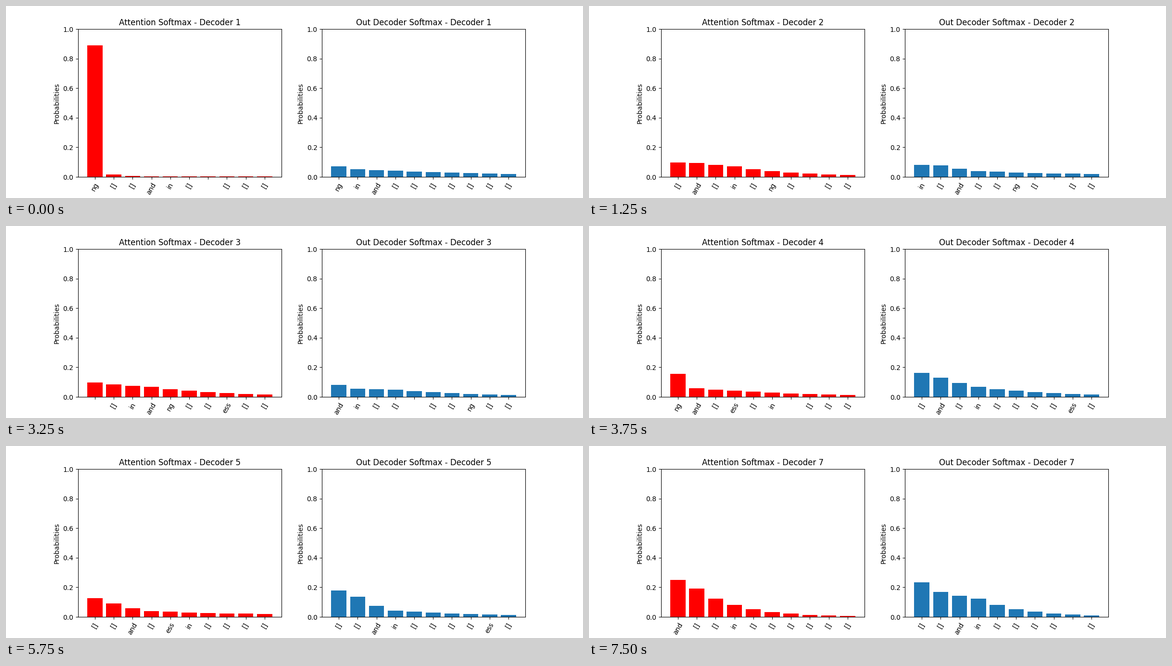
These frames come from a looping animation (1200x400 px, 8000 ms). A matplotlib script:

```python
import matplotlib.pyplot as plt
import numpy as np
from matplotlib.animation import FuncAnimation

plt.rcParams["font.family"] = "DejaVu Sans"

INTERVAL = 250        # ms per frame
FRAMES = 32
FRAMES_PER_STEP = 5   # each decoder stays for 1250 ms
RANKS = np.arange(10)
KEY_RANKS = (0, 1, 3, 9)

# Per decoder: the ranked tokens ("_" is blank) and the percentages at
# KEY_RANKS; the bars between them decay geometrically.
ATTENTION = [
    ("ng [] [] and in [] _ [] [] []", (89, 1.6, 0.3, 0.3)),
    ("[] and [] in [] ng [] _ [] []", (9.7, 9.4, 7.1, 1.3)),
    ("_ [] in and ng [] [] ess [] []", (9.7, 8.4, 6.8, 1.6)),
    ("ng and [] ess [] in _ [] [] []", (15.6, 5.8, 4.2, 1.3)),
    ("[] [] and [] ess in [] [] [] []", (12.7, 9.1, 3.9, 1.9)),
    ("[] and in [] [] [] [] _ _ of", (26.9, 18.5, 2.9, 1)),
    ("and [] [] in [] [] [] [] [] []", (25, 19.2, 8.1, 0.6)),
]
OUTPUT = [
    ("ng in and [] [] [] [] [] [] []", (7.1, 5.2, 4.2, 1.9)),
    ("in [] and [] [] ng [] _ [] []", (8.1, 7.8, 3.9, 1.9)),
    ("and in [] [] _ [] [] ng [] []", (8.1, 5.5, 4.9, 1.3)),
    ("[] and [] in [] [] [] [] ess []", (16.2, 13, 6.8, 1.6)),
    ("[] [] and in [] [] [] [] ess []", (17.9, 13.6, 4.2, 1.3)),
    ("[] and in [] [] [] [] [] [] _", (21.8, 11.7, 7.1, 1.3)),
    ("[] [] and in [] [] [] [] _ []", (23.4, 16.9, 12.3, 1)),
]


def decay(keys):
    """Probabilities of all ranks, interpolated on a log scale."""
    return np.exp(np.interp(RANKS, KEY_RANKS, np.log(keys))) / 100


class Panel:
    """A bar chart that shows one decoder step at a time."""

    def __init__(self, ax, name, color, steps):
        self.ax, self.name, self.steps = ax, name, steps
        self.bars = ax.bar(RANKS, np.ones(len(RANKS)), color=color)
        ax.set_ylim(0, 1)
        ax.set_ylabel("Probabilities")

    def show(self, step):
        tokens, keys = self.steps[step]
        for bar, height in zip(self.bars, decay(keys)):
            bar.set_height(height)
        labels = tokens.replace("_", "").split(" ")
        self.ax.set_xticks(RANKS, labels, rotation=60)
        self.ax.set_title(f"{self.name} - Decoder {step + 1}")


fig, (left, right) = plt.subplots(1, 2, figsize=(12, 4), dpi=100)
panels = [
    Panel(left, "Attention Softmax", "red", ATTENTION),
    Panel(right, "Out Decoder Softmax", "tab:blue", OUTPUT),
]


def update(frame):
    for panel in panels:
        panel.show(frame // FRAMES_PER_STEP)
    return []


anim = FuncAnimation(fig, update, frames=FRAMES, init_func=lambda: update(0),
                     interval=INTERVAL, repeat=True, repeat_delay=0)
plt.show()
```
